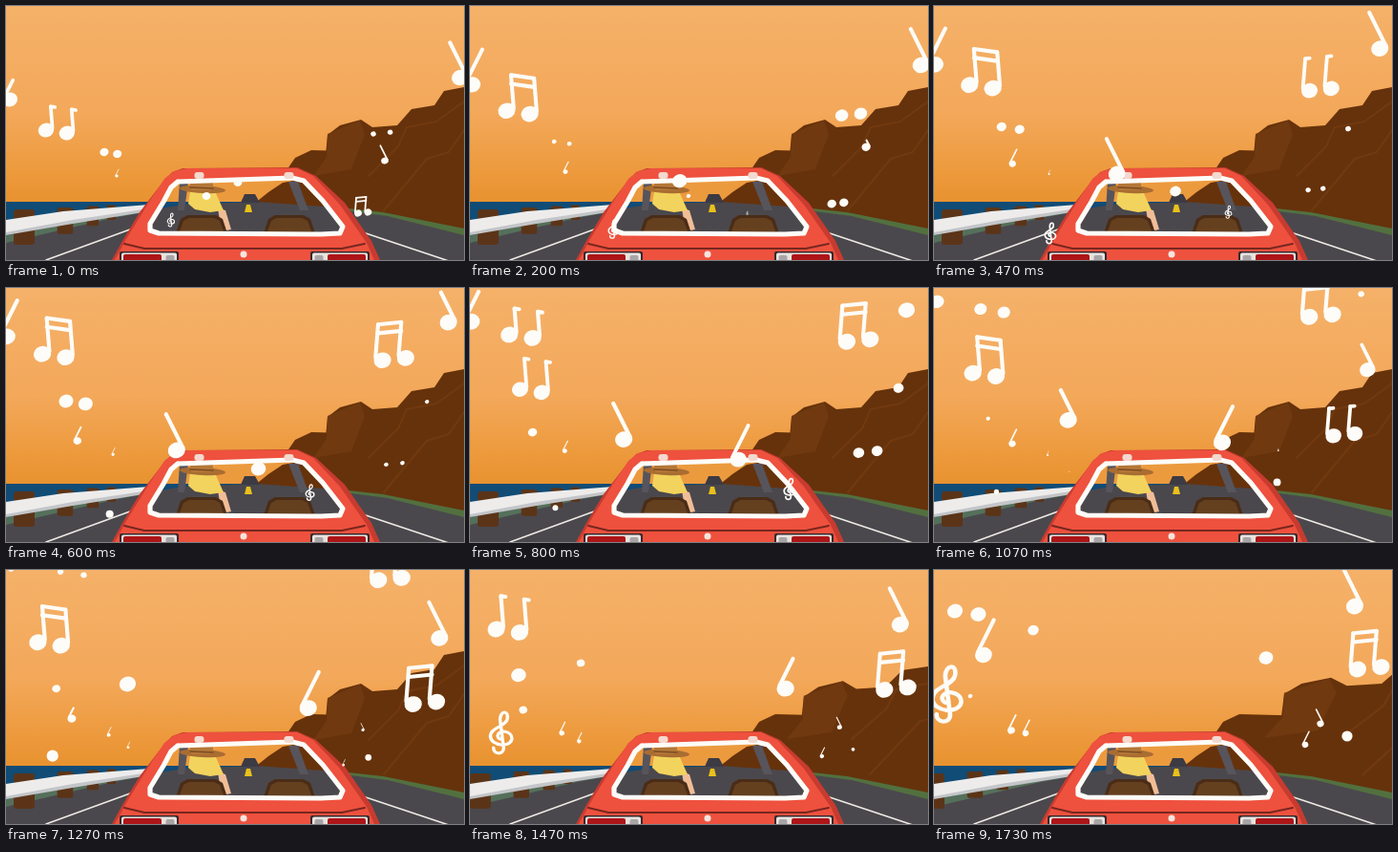
An HTML page with a canvas that plays this animation: 480 by 266 pixels, repeating every 1790 ms.

```html
<!DOCTYPE html>
<html lang="en">
<head>
<meta charset="utf-8">
<title>Coast drive</title>
<style>
html, body { margin: 0; width: 100%; height: 100%; overflow: hidden; background: #f3a95c; }
canvas { display: block; width: 100vw; height: 100vh; }
</style>
</head>
<body>
<canvas id="stage" width="480" height="266"></canvas>
<script>
const ctx = document.getElementById('stage').getContext('2d');
const LOOP = 1790, STEP = 66.3, LAST = 26;
const WHITE = '#fdfcf8', ROAD = '#4a484d', BROWN = '#5b3418', RED = '#ee513e';
const SEA = '#104c76', ROCK = '#66320b', FACET = '#71390f';
const clamp = v => Math.max(0, Math.min(1, v));
const mix = (a, b, p) => a + (b - a) * p;

const sky = ctx.createLinearGradient(0, 0, 0, 206);
sky.addColorStop(0, '#f5b169');
sky.addColorStop(.55, '#f3a85a');
sky.addColorStop(.8, '#ee9c41');
sky.addColorStop(1, '#e8922f');

function trace(points) {
  ctx.beginPath();
  for (let i = 0; i < points.length; i += 2) ctx.lineTo(points[i], points[i + 1]);
}
function poly(color, ...points) {
  trace(points);
  ctx.closePath();
  ctx.fillStyle = color;
  ctx.fill();
}
function line(color, width, ...points) {
  trace(points);
  ctx.strokeStyle = color;
  ctx.lineWidth = width;
  ctx.stroke();
}
function oval(color, x, y, rx, ry = rx, tilt = 0) {
  ctx.beginPath();
  ctx.ellipse(x, y, rx, ry, tilt, 0, 7);
  ctx.fillStyle = color;
  ctx.fill();
}
function box(color, x, y, w, h, r = 0) {
  ctx.beginPath();
  ctx.roundRect(x, y, w, h, r);
  ctx.fillStyle = color;
  ctx.fill();
}

// Scenery: drive is 0 while it holds still, 1 at the end of the loop
function rocks(drive) {
  poly(ROCK, 290, 178, 303, 159, 320, 151, 400, 153, 420, 230, 320, 230);
  ctx.save();
  ctx.translate(262, 210);
  ctx.scale(1 + .4 * drive, 1 + .07 * drive);
  ctx.translate(-262, -210);
  poly(ROCK, 318, 178, 335, 156, 337, 135, 350, 125, 372, 119, 384, 127, 410, 125,
    425, 108, 449, 104, 459, 89, 480, 85, 480, 250, 340, 230);
  poly(FACET, 337, 134, 371, 120, 376, 134, 362, 171, 322, 178, 336, 158);
  line(FACET, 2, 480, 100, 451, 121, 420, 127, 411, 147, 380, 178);
  line(FACET, 2, 480, 130, 464, 153, 441, 160, 396, 214);
  ctx.restore();
}

function scenery(drive) {
  ctx.fillStyle = sky;
  ctx.fillRect(0, 0, 480, 266);
  box(SEA, 0, 205, 300, 40);
  rocks(drive);
  poly('#52703f', 340, 210, 395, 216, 480, 233, 480, 248, 345, 220);
  poly('#55705a', 0, 240, 150, 213, 150, 222, 0, 256);
  poly(ROAD, 0, 248, 112, 222, 190, 208, 262, 205, 345, 213, 400, 220, 480, 240, 480, 266, 0, 266);
  line('#eeeae5', 1.6, 42, 266, 130, 234);
  line('#eeeae5', 1.6, 365, 234, 464, 267);
  for (let i = 0; i < 4; i++) {
    const near = .75 ** i;
    box(BROWN, 150 - 142 * near ** 1.35 - 19 * drive, 205 + 8 * near, 22 * near, 37 * near, 3 * near);
  }
  poly('#c3c5c8', 0, 234, 70, 222, 150, 211, 150, 215, 70, 228, 0, 240);
  poly('#edeceb', 0, 224, 60, 215, 150, 208, 150, 212, 70, 224, 0, 237);
}

const glass = [180, 184, 300, 180, 312, 183, 332, 204, 353, 231, 350, 238, 330, 239,
  160, 238, 151, 235, 151, 228, 165, 205, 173, 190];

function car() {
  poly('#c83b2f', 174, 174, 185, 170, 305, 169, 325, 178, 355, 206, 383, 246, 392, 266, 111, 266,
    122, 246, 140, 216, 160, 190);
  poly(RED, 176, 173, 190, 170, 305, 170, 322, 178, 350, 208, 378, 248, 386, 266, 114, 266, 126, 244, 150, 205, 166, 181);
  ctx.save();
  trace(glass);
  ctx.clip();
  ctx.fillStyle = '#ec9a3e';
  ctx.fillRect(140, 178, 220, 64);
  box(SEA, 140, 205, 110, 8);
  poly(ROCK, 260, 207, 275, 195, 290, 185, 330, 178, 345, 215);
  poly(ROAD, 140, 216, 185, 208, 262, 205, 290, 207, 360, 212, 360, 244, 140, 244);
  poly('#3c3a42', 246, 206, 250, 197, 261, 197, 266, 206);
  poly('#e9c11b', 252, 208, 256, 208, 258, 216, 250, 216);
  poly('#57545c', 182, 184, 191, 184, 187, 214, 180, 214);
  poly('#57545c', 296, 184, 306, 184, 317, 214, 308, 214);
  // driver
  poly('#f0bd97', 222, 212, 230, 214, 236, 234, 226, 236);
  poly('#f2d35d', 193, 194, 219, 194, 228, 214, 214, 216, 198, 213, 191, 207);
  oval('#a96d31', 206, 192, 24, 4, .05);
  box('#b47738', 193, 182, 24, 11, 4);
  line('#7c4b20', 1.5, 193, 190, 217, 191);
  for (const x of [178, 270]) {
    poly('#4a2c17', x, 238, x + 5, 223, x + 12, 219, x + 42, 219, x + 49, 223, x + 54, 238);
    poly('#65401f', x + 4, 236, x + 8, 225, x + 14, 222, x + 40, 222, x + 46, 225, x + 50, 236);
  }
  ctx.restore();
  line(WHITE, 5.2, ...glass, ...glass.slice(0, 2));
  line('#77271f', 1.8, 124, 249, 145, 254, 352, 254, 376, 249);
  for (const side of [-1, 1]) {
    const lamp = (color, x, w, h) => box(color, 250 + side * x - w / 2, 267 - h, w, h + 3, 2);
    box('#f3d9cf', 249.5 + side * 47 - 5, 174, 10, 7, 3);
    lamp('#39272b', 100, 62, 10);
    lamp('#e7e4df', 100, 58, 8.5);
    lamp('#ad1518', 107, 40, 7);
    lamp('#a9a5a7', 78, 9, 6);
  }
  oval('#f6e4dc', 249, 260, 3.5);
}

// A note grows with age and opens and closes its stem in a fixed cycle.
// Its path over the loop runs from one point to another, bent towards a third.
const notes = [];
function add(kind, lean, birth, from, to, bend = from.map((v, i) => mix(v, to[i], .5))) {
  notes.push({ kind, lean, birth, from, to, bend });
}
add('pair', 1, -29.5, [42, 130], [85, -45], [22, 42]);
add('pair', 1, -18.5, [103, 153], [22, 43], [36, 106]);
add('pair', -1, -23.7, [385, 134], [378, -35], [408, 50]);
add('pair', -1, -14, [369, 217], [444, 104], [414, 176]);
add('one', 1, -29, [4, 98], [14, -38], [-6, 30]);
add('one', 1, -6, [116, 178], [52, 89], [42, 162]);
add('one', 1, 3, [150, 176], [38, 132], [96, 184]);
add('one', 1, 12, [180, 186], [81, 168]);
add('one', 1, 14, [215, 226], [96, 171]);
add('one', -1, -25, [243, 185], [104, 63], [138, 184]);
add('one', 1, -19, [210, 199], [348, 92], [294, 206]);
add('one', -1, -32, [476, 75], [415, -35], [465, 18]);
add('one', -1, -13.7, [397, 162], [441, 38], [483, 100]);
add('one', -1, 13, [290, 185], [405, 161]);
add('one', 1, 14, [258, 262], [389, 183]);
add('clef', 1, -8, [173, 224], [14, 130], [73, 277]);
add('clef', 1, -.5, [279, 216], [433, 174], [326, 223]);

function clef(x, y, size) {
  ctx.save();
  ctx.translate(x, y);
  ctx.rotate(.1);
  ctx.scale(size * 1.1, size);
  ctx.beginPath();
  ctx.moveTo(-.9, 2.4);
  ctx.bezierCurveTo(-.9, 3.4, .6, 3.4, .5, 2.3);
  ctx.lineTo(-.4, -2);
  ctx.bezierCurveTo(-.5, -3.4, .7, -3.6, .6, -2.2);
  ctx.bezierCurveTo(.5, -1, -1.6, -.7, -1.5, .7);
  ctx.bezierCurveTo(-1.3, 2.2, 1.5, 2.2, 1.5, .7);
  ctx.bezierCurveTo(1.4, -.5, -.5, -.5, -.5, .5);
  ctx.quadraticCurveTo(-.4, 1, .1, 1);
  ctx.strokeStyle = WHITE;
  ctx.lineWidth = .46;
  ctx.stroke();
  ctx.restore();
}

function drawNote({ kind, lean, birth, from, to, bend }, f) {
  const age = f - birth, size = Math.min(9.2, .28 * age);
  if (size < .5) return;
  const p = f / LAST;
  const [x, y] = from.map((v, i) => mix(mix(v, bend[i], p), mix(bend[i], to[i], p), p));

  const open = 15, cycle = 26, u = (age + cycle - 2) % cycle;
  const grow = Math.sqrt(clamp(Math.min(u, open - u) / 3));
  const dip = u < open ? 0 : Math.sin(Math.PI * (u - open) / (cycle - open)) ** 2;
  const r = size * (1 - .65 * dip), pen = size * .45;
  if (kind === 'clef') {
    if (grow > .6) clef(x, y, size * grow);
    else oval(WHITE, x, y, r * .85);
    return;
  }

  const pair = kind === 'pair';
  const gap = pair ? size * 2.65 : 0, drop = gap * (lean > 0 ? .14 : -.1);
  const foot = lean * (pair ? .8 : -.7), top = lean * (pair ? .5 : 1.2);
  const tops = [];
  for (const i of pair ? [0, 1] : [0]) {
    const hx = x + gap * i, hy = y + drop * i;
    oval(WHITE, hx, hy, r, r * .9, -.3);
    if (!grow) continue;
    const tip = [hx + mix(foot, top, grow) * size, hy - (.3 + 3.8 * grow) * size];
    line(WHITE, pen, hx + foot * size, hy - .3 * size, ...tip);
    tops.push(tip);
  }
  if (!pair || grow < .6) return;
  const joined = grow === 1, reach = joined ? 1 : .2;
  for (const [tx, ty] of joined ? [tops[0]] : tops)
    for (const d of joined ? [0, size] : [0])
      line(WHITE, pen, tx, ty + d, tx + gap * reach, ty + d + drop * reach);
}

function draw(now) {
  const f = Math.min(LAST, Math.floor((now % LOOP + 3) / STEP));
  ctx.lineCap = ctx.lineJoin = 'round';
  scenery(clamp((f - 19) / 7));
  car();
  for (const n of notes) drawNote(n, f);
}

const begin = performance.now();
function tick() {
  draw(performance.now() - begin);
  requestAnimationFrame(tick);
}
tick();
</script>
</body>
</html>
```
